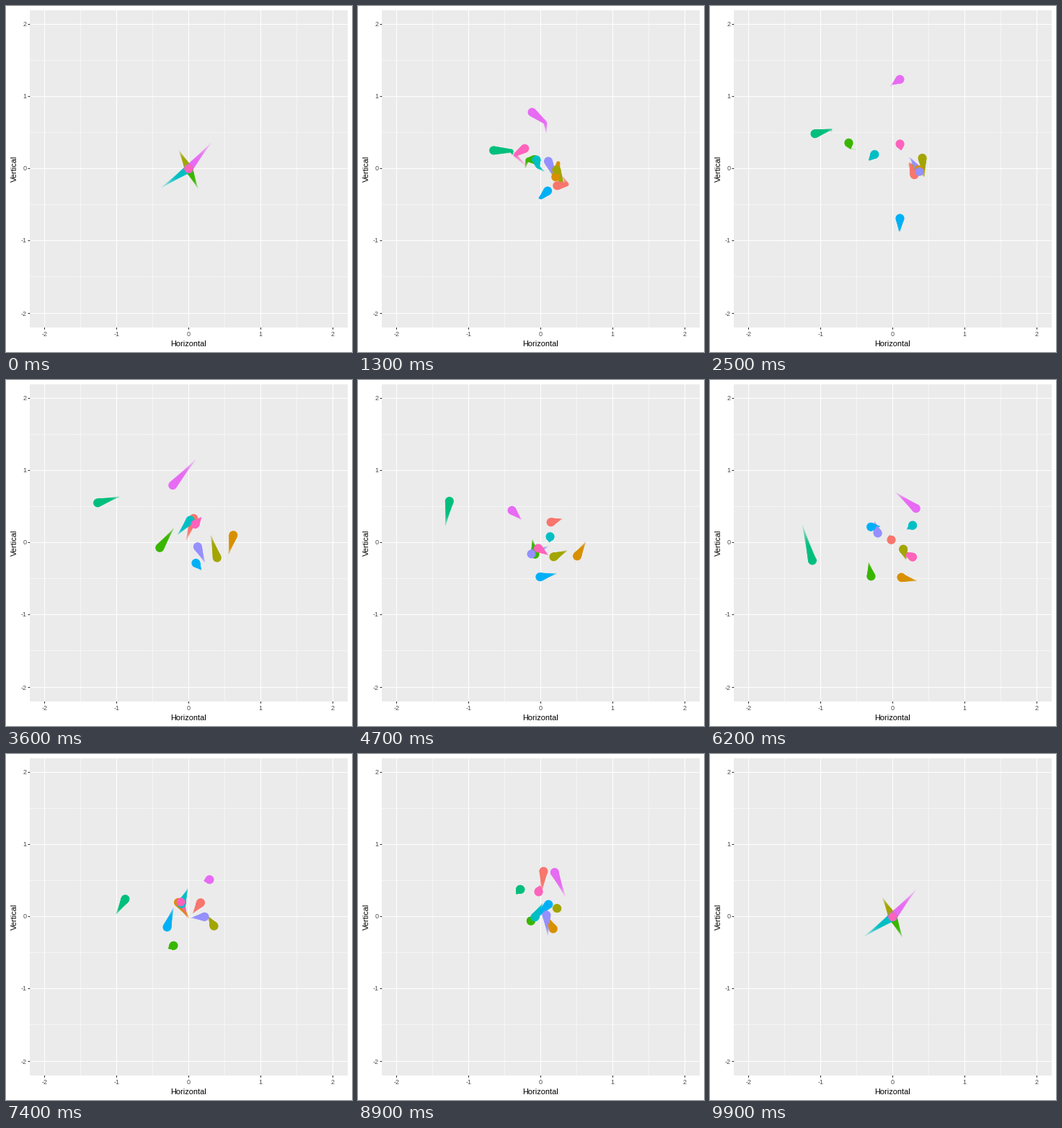
A matplotlib script that plays this animation: 480 px wide and 480 px high, repeating every 10000 ms.

```python
import numpy as np
import matplotlib.pyplot as plt
from matplotlib.animation import FuncAnimation
from matplotlib.colors import to_rgba_array
from matplotlib.patches import Rectangle

plt.rcParams["font.family"] = "Liberation Sans"

SIZE, DPI = 480, 72
FRAMES, DETAIL, WAKE = 100, 5, 25      # wake length in substeps
STEPS = FRAMES * DETAIL
CX, CY, UNIT = 253.5, 225.8, 100.1
HEAD, TAIL = 6.0, 0.8                  # dot radii in pixels

# Each walk leaves the origin, wanders through its stops and comes back.
# A walk with no sixth stop is already home by then.
WALKS = {
    "#F8766D": [(.30, -.085), (.14, .285), (-.02, .04), (.165, .195), (.04, .64)],
    "#D89000": [(.37, -.02), (.505, -.185), (.12, -.485), (-.145, .20), (.175, -.17)],
    "#A3A500": [(.41, .15), (.18, -.195), (.145, -.09), (.35, -.13), (.23, .115), (-.15, .28)],
    "#39B600": [(-.61, .36), (-.08, -.16), (-.30, -.465), (-.21, -.40), (-.14, -.055), (.14, -.30)],
    "#00BF7D": [(-1.08, .485), (-1.265, .58), (-1.115, -.25), (-.88, .245), (-.285, .385)],
    "#00BFC4": [(-.25, .20), (.13, .085), (.28, .24), (-.10, .18), (-.075, 0), (-.42, -.29)],
    "#00B0F6": [(.10, -.685), (-.01, -.475), (-.305, .22), (-.30, -.145), (.11, .175)],
    "#9590FF": [(.37, -.04), (-.13, -.155), (-.21, .135), (.22, 0), (.08, .025)],
    "#E76BF3": [(.10, 1.24), (-.40, .45), (.325, .475), (.29, .515), (.19, .62), (.345, .40)],
    "#FF62BC": [(.10, .345), (-.035, -.075), (.28, -.20), (-.11, .205), (-.03, .35)],
}
STOPS = [0, 5, 9, 12, 14, 17, 18, 19]  # knots with a given place
times = np.arange(20.0)
times[STOPS[1:6]] = 4.8, 9.02, 11.9, 14.2, 17.08
rng = np.random.default_rng(12)


def wander(stops):
    """Straight legs between stops, shaken at the knots in between."""
    pts = np.zeros((len(STOPS), 2))
    pts[1:len(stops) + 1] = stops
    path = np.column_stack([np.interp(times, times[STOPS], c) for c in pts.T])
    drift = rng.normal(0, 0.15, path.shape)
    drift[STOPS] = 0
    return path + drift


paths = [wander(stops) for stops in WALKS.values()]


def to_px(x, y):
    return CX + UNIT * x, CY - UNIT * y


def track(steps):
    """Pixel positions, one row per substep and walker."""
    t = np.asarray(steps) % STEPS / (STEPS - 1) * times[-1]
    xy = [to_px(np.interp(t, times, p[:, 0]), np.interp(t, times, p[:, 1]))
          for p in paths]
    return np.transpose(xy, (2, 0, 1)).reshape(-1, 2)


fig = plt.figure(figsize=(SIZE / DPI, SIZE / DPI), dpi=DPI, facecolor="white")
ax = fig.add_axes([0, 0, 1, 1])
ax.set(xlim=(0, SIZE), ylim=(SIZE, 0))
ax.axis("off")

# Panel, grid and axes
left, top = to_px(-2.2, 2.2)
right, bottom = to_px(2.2, -2.2)
ax.add_patch(Rectangle((left, top), right - left, bottom - top,
                       facecolor="#EBEBEB", linewidth=0))


def line(xs, ys, color="white", width=1.07):
    ax.plot(xs, ys, color=color, linewidth=width, snap=False,
            solid_capstyle="butt")


def grid(v, width):
    """Grid lines for one value, centred on whole pixels."""
    x, y = np.floor(to_px(v, v)) + 0.5
    line([x, x], [top, bottom], width=width)
    line([left, right], [y, y], width=width)
    return x, y


for v in np.arange(-1.5, 2):
    grid(v, 0.53)

label = dict(fontsize=9, color="#4D4D4D", va="baseline")
for v in range(-2, 3):
    x, y = grid(v, 1.07)
    line([x, x], [bottom, bottom + 2.75], "#333333")
    line([left - 2.75, left], [y, y], "#333333")
    ax.text(x - 0.3, 458, str(v), ha="center", **label)
    ax.text(28.5, y + 3, str(v), ha="right", **label)

ax.text(CX - 0.5, 471.7, "Horizontal", fontsize=11, ha="center", va="baseline")
ax.text(17, CY, "Vertical", fontsize=11, rotation=90, ha="right", va="center")

# Wake dots run from oldest to newest, full heads come last
life = np.repeat(np.linspace(0, 1, WAKE + 1), len(paths))
radius = TAIL + (HEAD - TAIL) * life ** 1.4
rgba = np.tile(to_rgba_array(list(WALKS)), (WAKE + 1, 1))
rgba[:, 3] = life ** 0.6
dots = ax.scatter(*track(range(WAKE + 1)).T, s=(2 * radius) ** 2, c=rgba,
                  linewidths=0, zorder=3)


def draw(n):
    now = round(n * (STEPS - 1) / (FRAMES - 1))
    dots.set_offsets(track(range(now - WAKE, now + 1)))
    return dots,


anim = FuncAnimation(fig, draw, frames=FRAMES, interval=100,
                     repeat=True, repeat_delay=0)
plt.show()
```
